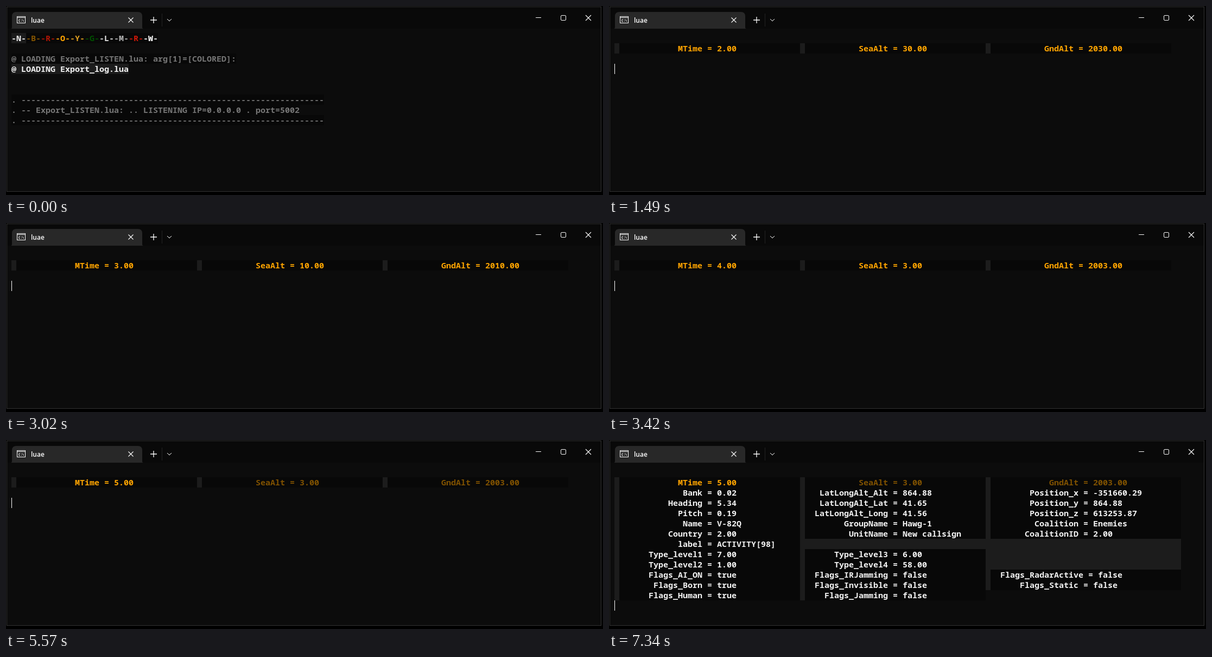
An HTML page for the animation above (8 s loop, 1100x350 px).

```html
<!DOCTYPE html>
<html lang="en">
<head>
<meta charset="utf-8">
<title>Terminal</title>
<style>
  html, body { margin: 0; width: 100%; height: 100%; overflow: hidden; background: #000; }
  svg { display: block; width: 1100px; height: 350px; }
  #screen text { font: 600 15px "Noto Sans Mono", "DejaVu Sans Mono", monospace; white-space: pre; }
  .title { font: 600 12px "Open Sans", "Noto Sans", sans-serif; fill: #fff; }
  .line { fill: none; stroke: #fff; }
</style>
</head>
<body>
<svg viewBox="0 0 1100 350">
  <rect x="1.5" y="1.5" width="1095" height="342" fill="#0c0c0c" stroke="#333"/>
  <rect x="2" y="2" width="1094" height="40" fill="#090909"/>
  <path d="M9 42q2 0 2-3V19q0-8 8-8h224q8 0 8 8v20q0 3 2 3z" fill="#282828"/>
  <rect class="line" x="20.5" y="19.5" width="15" height="12"/>
  <path class="line" d="M20 21.5h16"/>
  <path class="line" d="M26 25.2h-2.2v3.6H26M28.5 25.2v1M28.5 27.8v1M30.5 24.8l2 4.2" stroke-width=".9"/>
  <text class="title" x="46" y="31">luae</text>
  <path class="line" d="M225.5 21.5l9 9m0-9l-9 9" stroke-width="1.1"/>
  <path class="line" d="M266 26h12M272 20v12" stroke-width="1.3"/>
  <path d="M287.5 14v24" stroke="#222"/>
  <path class="line" d="M297 24l4 4 4-4" stroke="#ccc"/>
  <path class="line" d="M976 21.5h10"/>
  <rect class="line" x="1022.5" y="17.5" width="9" height="9" rx="1.5"/>
  <path class="line" d="M1068 17l10 10m0-10l-10 10" stroke-width="1.1"/>
  <g id="screen"></g>
</svg>
<script>
const LOOP = 8000, CW = 9, RH = 19, LEFT = 10, TOP = 50;
const WHITE = '#f2f2f2', GRAY = '#767676', ORANGE = '#ffa500', DIM = '#805200';
const DARK = '#080808', LIGHT = '#1c1c1c';
const screen = document.getElementById('screen');

const x = col => LEFT + col * CW;
const y = row => TOP + row * RH;
const box = (col, row, cols, rows, fill) =>
  `<rect x="${x(col)}" y="${y(row)}" width="${cols * CW}" height="${rows * RH}" fill="${fill}"/>`;
const text = (col, row, str, fill) =>
  `<text x="${x(col)}" y="${y(row) + 15}" fill="${fill}">${str}</text>`;
const marked = (col, row, str, fill, back = DARK) =>
  box(col, row, str.length, 1, back) + text(col, row, str, fill);
const cursor = row => `<rect x="${LEFT}" y="${y(row)}" width="1" height="${RH}" fill="#fff"/>`;

// The label ends at column `end`; the value follows " = ".
const field = (end, row, label, value, fill = WHITE) =>
  text(end - label.length, row, `${label} = ${value}`, fill);
const fields = (end, row, list) =>
  list.split('|').map((item, i) => field(end, row + i, ...item.split('='))).join('');

function intro() {
  const palette = {
    N: WHITE, B: '#855500', R: '#b01505', O: '#ffa500', Y: '#e0a020',
    G: '#005000', L: '#e0e0e0', M: '#b4b4b4', W: '#ffffff'
  };
  const swatches = [...'NBROYGLMRW'].map((c, i) =>
    marked(i * 3, 0, `-${c}-`, i === 8 ? '#d01808' : palette[c], i ? DARK : LIGHT)).join('');
  const rule = '. ' + '-'.repeat(62);
  return swatches +
    marked(0, 2, '@ LOADING Export_LISTEN.lua: arg[1]=[COLORED]:', GRAY) +
    marked(0, 3, '@ LOADING Export_log.lua', WHITE, LIGHT) +
    marked(0, 6, rule, GRAY) +
    marked(0, 7, '. -- Export_LISTEN.lua: .. LISTENING IP=0.0.0.0 . port=5002', GRAY) +
    marked(0, 8, rule, GRAY);
}

function status(time, alt, timeFill, altFill = timeFill) {
  const cells = [0, 38, 76].map(c => box(c, 1, 1, 1, LIGHT) + box(c + 1, 1, 37, 1, DARK)).join('');
  return cells +
    field(18, 1, 'MTime', time.toFixed(2), timeFill) +
    field(56, 1, 'SeaAlt', alt.toFixed(2), altFill) +
    field(94, 1, 'GndAlt', (2000 + alt).toFixed(2), altFill) +
    cursor(3);
}

function report() {
  return box(0, 1, 77, 11, LIGHT) + box(0, 12, 39, 1, LIGHT) + box(77, 7, 39, 3, LIGHT) +
    box(1, 1, 37, 12, DARK) +
    box(39, 1, 37, 6, DARK) + box(39, 8, 37, 5, DARK) +
    box(77, 1, 39, 6, DARK) + box(77, 10, 39, 2, DARK) +
    field(18, 1, 'MTime', '5.00', ORANGE) +
    field(56, 1, 'SeaAlt', '3.00', DIM) +
    field(95, 1, 'GndAlt', '2003.00', DIM) +
    fields(18, 2, 'Bank=0.02|Heading=5.34|Pitch=0.19|Name=V-82Q|Country=2.00|label=ACTIVITY[98]|' +
      'Type_level1=7.00|Type_level2=1.00|Flags_AI_ON=true|Flags_Born=true|Flags_Human=true') +
    fields(56, 2, 'LatLongAlt_Alt=864.88|LatLongAlt_Lat=41.65|LatLongAlt_Long=41.56|' +
      'GroupName=Hawg-1|UnitName=New callsign') +
    fields(56, 8, 'Type_level3=6.00|Type_level4=58.00|Flags_IRJamming=false|' +
      'Flags_Invisible=false|Flags_Jamming=false') +
    fields(95, 2, 'Position_x=-351660.29|Position_y=864.88|Position_z=613253.87|' +
      'Coalition=Enemies|CoalitionID=2.00') +
    field(96, 10, 'Flags_RadarActive', 'false') +
    field(95, 11, 'Flags_Static', 'false') +
    cursor(13);
}

const scenes = [
  [0, intro],
  [500, () => status(1, 50, WHITE)],
  [1490, () => status(2, 30, ORANGE)],
  [2410, () => status(3, 10, ORANGE)],
  [3420, () => status(4, 3, ORANGE)],
  [4410, () => status(5, 3, ORANGE, DIM)],
  [6340, report]
];

let shown = null;
function draw() {
  const t = performance.now() % LOOP;
  const scene = scenes.filter(([start]) => start <= t).pop();
  if (scene !== shown) {
    shown = scene;
    screen.innerHTML = scene[1]();
  }
  requestAnimationFrame(draw);
}
draw();
</script>
</body>
</html>
```
